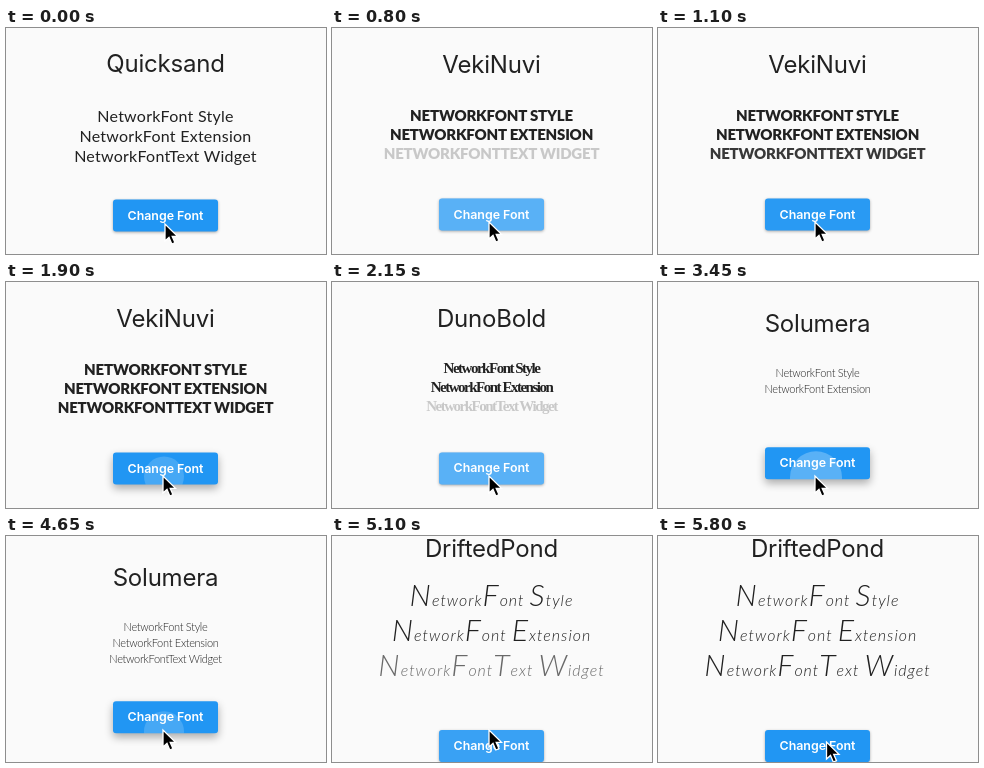
These frames come from a looping animation (320 by 226 pixels, 6 s). An HTML page:

```html
<!DOCTYPE html>
<html lang="en">
<head>
<meta charset="utf-8">
<title>Change Font</title>
<style>
  html, body { margin: 0; width: 100%; height: 100%; overflow: hidden; background: #fafafa; }
  #stage { position: relative; width: 320px; height: 226px; overflow: hidden; }
  #stage > * { position: absolute; left: 0; top: 0; }
  #title, .line { width: 319px; height: 40px; line-height: 40px; text-align: center; white-space: nowrap; color: #212121; }
  #title { font: 400 24px/40px Inter, sans-serif; letter-spacing: -.2px; }
  .line b { font-weight: inherit; }

  .fallback { font: 400 15.5px/40px Inter, sans-serif; }
  .round { font: 400 16px/40px Lato, sans-serif; letter-spacing: .25px; }
  .brush { font: 900 15px/40px Lato, sans-serif; letter-spacing: -.2px; text-transform: uppercase; }
  .narrow { font: 700 15px/40px "Liberation Serif", serif; letter-spacing: -1.5px; }
  .thin { font: 300 11px/40px Lato, sans-serif; letter-spacing: -.3px; }
  .script { font: italic 300 16px/40px Lato, sans-serif; letter-spacing: 1px; }
  .script b { font-size: 1.9em; line-height: 0; }

  #button { width: 105px; height: 32px; border-radius: 3px; overflow: hidden; background: #2196f3; }
  #label { position: absolute; inset: 0; text-align: center; color: #fff; font: 600 12.4px/32px Inter, sans-serif; }
  #ripple { position: absolute; border-radius: 50%; background: #fff; }
</style>
</head>
<body>
<div id="stage">
  <div id="title"></div>
  <div class="line"></div>
  <div class="line"></div>
  <div class="line"></div>
  <div id="button"><div id="ripple"></div><div id="label">Change Font</div></div>
  <svg id="cursor" width="18" height="26" viewBox="-2 -2 18 26">
    <path d="M0 0V17L4 13.4L6.8 20L10 18.7L7.2 12.3H12.5Z" fill="#000" stroke="#fff" stroke-width="1.3"/>
  </svg>
</div>
<script>
const LOOP = 6000, STEP = 50;
const $ = id => document.getElementById(id);
const lines = [...document.querySelectorAll('.line')];
const texts = ['NetworkFont Style', 'NetworkFont Extension', 'NetworkFontText Widget'];
texts.forEach((s, i) => lines[i].innerHTML = s.replace(/[A-Z]/g, '<b>$&</b>'));

// pitch: line height; mid: centre of the second line; press: click that selects the font
const fonts = [
  { name: 'Quicksand', style: 'round', pitch: 20, mid: 108, press: -LOOP },
  { name: 'VekiNuvi', style: 'brush', pitch: 19.3, mid: 106, press: 50, loaded: 800 },
  { name: 'DunoBold', style: 'narrow', pitch: 19.2, mid: 105, press: 1900 },
  { name: 'Solumera', style: 'thin', pitch: 15.8, mid: 107, press: 3350 },
  { name: 'DriftedPond', style: 'script', pitch: 35, mid: 99, press: 4650 }
];
const pointer = [[0, 159, 196], [50, 159, 196], [150, 157, 194], [5400, 157, 194],
  [5530, 126, 202], [5680, 181, 203], [5800, 168.5, 206], [LOOP, 168.5, 206]];

const clamp = v => Math.max(0, Math.min(1, v));
const ramp = (t, a, b) => clamp((t - a) / (b - a));
const move = (el, x, y) => el.style.transform = `translate(${x}px, ${y}px)`;

function pointerAt(t) {
  const i = pointer.findIndex(p => p[0] > t);
  const [a, x, y] = pointer[i - 1], [b, x2, y2] = pointer[i];
  const k = ramp(t, a, b);
  return [x + (x2 - x) * k, y + (y2 - y) * k];
}

// Time since the click; the interface freezes while a font is loading.
function elapsed(font, t) {
  if (!font.loaded) return t - font.press;
  return t < font.loaded ? Math.min(t - font.press, 100) : t - font.loaded + 250;
}

function draw(t) {
  const pressed = fonts.findLastIndex(f => t >= f.press);
  const age = elapsed(fonts[pressed], t);
  const font = fonts[age < 100 ? pressed - 1 : pressed];
  const loading = t < font.loaded;

  $('title').textContent = font.name;
  move($('title'), 0, 65.5 - 1.5 * font.pitch - 20);
  lines.forEach((line, i) => {
    line.className = 'line ' + (loading ? 'fallback' : font.style);
    move(line, 0, font.mid + (i - 1) * font.pitch - 20);
  });
  lines[2].style.opacity = age < 100 ? 1 : ramp(age, 150, 600);

  const top = 141.6 + 1.5 * font.pitch;
  move($('button'), 107, top);
  const lift = 1 - ramp(age, 150, 250);
  $('button').style.boxShadow =
    `0 ${1 + 3 * lift}px ${3 + 6 * lift}px rgba(0,0,0,.32)`;

  const r = 20 + .06 * Math.min(age, 100) + 45 * ramp(age, 100, 250);
  Object.assign($('ripple').style, {
    left: 51 - r + 'px', top: 195 - top - r + 'px',
    width: 2 * r + 'px', height: 2 * r + 'px',
    opacity: Math.min(.25, .17 + age * .0008) * (1 - ramp(age, 250, 600))
  });

  const [x, y] = pointerAt(t);
  move($('cursor'), x - 2, y - 2);
}

const start = performance.now();
function tick() {
  const t = (performance.now() - start) % LOOP;
  draw(Math.floor(t / STEP) * STEP);
  requestAnimationFrame(tick);
}
tick();
</script>
</body>
</html>
```
